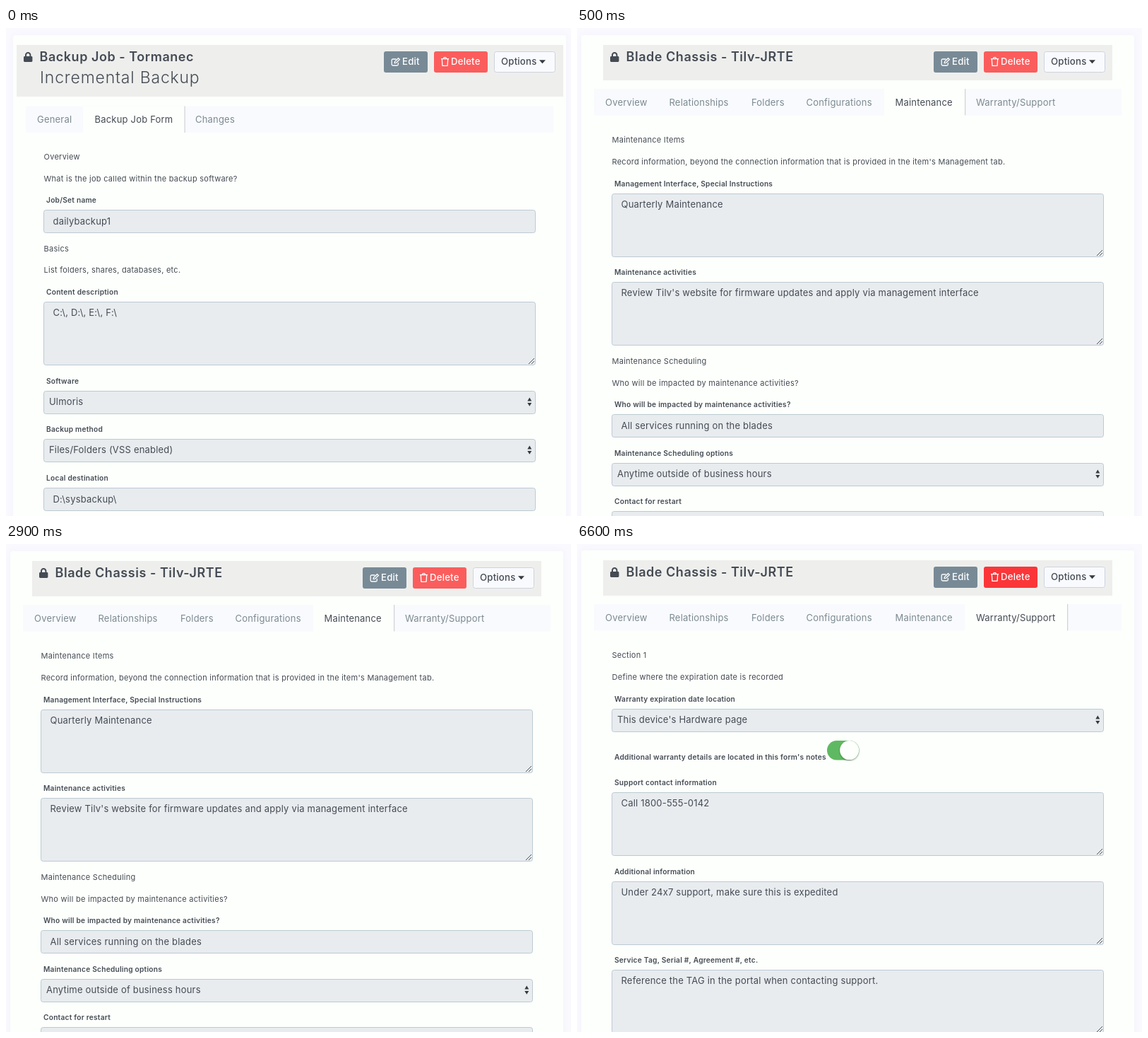
These frames come from a looping animation (800x690 px, 8 s). An HTML page:

```html
<!DOCTYPE html>
<html lang="en">
<head>
<meta charset="utf-8">
<title>Record forms</title>
<style>
  html, body { margin: 0; width: 100%; height: 100%; overflow: hidden; background: #f9f9fe; }
  svg { display: block; width: 800px; height: 690px; }
  text { font: 13px Inter, "Open Sans", sans-serif; letter-spacing: .015em; fill: #454b54; white-space: pre; }
  .title { font-size: 18px; font-weight: 600; letter-spacing: .03em; }
  .subtitle { font-size: 23px; font-weight: 300; letter-spacing: .035em; }
  .note { font-size: 11px; letter-spacing: .024em; }
  .label { font-size: 10.2px; font-weight: 600; letter-spacing: .022em; }
  .tab { fill: #7c8a90; }
  .button { font-size: 13.2px; font-weight: 500; }
  .white { fill: #fff; }
  .field { fill: #e8ecef; stroke: #bccad2; }
</style>
</head>
<body>
<svg id="stage" viewBox="0 0 800 690">
  <defs>
    <filter id="soft" x="-10%" y="-10%" width="120%" height="120%">
      <feDropShadow dx="0" dy="0" stdDeviation="5" flood-color="#e9e9f6" flood-opacity=".45"/>
    </filter>
    <filter id="knob" x="-20%" y="-20%" width="140%" height="150%">
      <feDropShadow dx="0" dy="1" stdDeviation=".8" flood-color="#000" flood-opacity=".4"/>
    </filter>
  </defs>
</svg>
<script>
const escapeText = s => s.replace(/&/g, "&amp;").replace(/</g, "&lt;");
const text = (x, y, s, cls = "") => `<text x="${x}" y="${y}" class="${cls}">${escapeText(s)}</text>`;
const rect = (x, y, w, h, fill, rx = 0, extra = "") =>
  `<rect x="${x}" y="${y}" width="${w}" height="${h}" rx="${rx}" fill="${fill}" ${extra}/>`;
const at = (x, y, content) => `<g transform="translate(${x} ${y})">${content}</g>`;

const lockIcon = `<path d="M3 7V4.3a3.2 3.2 0 0 1 6.4 0V7" fill="none" stroke="#454b54" stroke-width="2"/>`
  + rect(0, 6, 12.4, 8, "#454b54", 1.4);
const editIcon = `<g fill="none" stroke="#fff" stroke-width="1.3">
  <path d="M7 2H2.2Q.7 2 .7 3.5v6Q.7 11 2.2 11h6.1q1.5 0 1.5-1.5V7"/>
  <path d="M4.6 7.6 5 5.6 10 .7 11.9 2.5 6.8 7.4Z"/></g>`;
const trashIcon = `<path d="M0 2.6H11M3.4 2.4 4.2.7H6.8L7.6 2.4M1.3 2.8 1.9 12.3H9.1L9.7 2.8"
  fill="none" stroke="#fff" stroke-width="1.3" stroke-linejoin="round"/>`;

function buttons(x, y, deleteColor) {
  return at(x, y,
    rect(0, 0, 62, 30, "#788a96", 3) + at(10.5, 9, editIcon) + text(26, 19, "Edit", "button white")
    + rect(71, 0, 76, 30, deleteColor, 3) + at(81, 8, trashIcon) + text(95, 19, "Delete", "button white")
    + rect(156.5, .5, 86, 29, "#f9fafd", 3, 'stroke="#cdd3de"') + text(166, 19, "Options", "button")
    + `<path d="M220 12.3h9l-4.5 5z" fill="#343a42"/>`);
}

function card(x, y, width) {
  return rect(x, y, width, 720, "#fdfffc", 4, 'filter="url(#soft)"');
}

// Each tab is [text x, name]; the active one spans from..to.
function tabs(x, y, list, active, from, to) {
  return rect(x, y, 747, 37.5, "#f8fafe")
    + rect(from, y, to - from, 38, "#fdfffc")
    + rect(to - 1, y, 1.2, 37.5, "#cfd3d4")
    + list.map(([tx, name], i) => text(tx, y + 23.5, name, i === active ? "" : "tab")).join("");
}

const box = (x, y, h) => rect(x + .5, y + .5, 696, h - 1, "#e8ecef", 3, 'class="field"');
const input = (x, y, s) => box(x, y, 33) + text(x + 13.5, y + 21, s);
const area = (x, y, s) => box(x, y, 90) + text(x + 13.5, y + 20, s)
  + `<path d="M${x + 687} ${y + 88}l8-8m-4 8l4-4" stroke="#4c5258" fill="none"/>`;
const select = (x, y, s) => box(x, y, 33) + text(x + 8, y + 20, s)
  + `<path d="M${x + 685.3} ${y + 14.4}l3-4.8 3 4.8zm0 2.6h6l-3 4.8z" fill="#343a40"/>`;
const note = (x, y, s) => text(x + .5, y, s, "note");
const label = (x, y, s) => text(x + 4, y, s, "label");
const toggle = (x, y) => rect(x, y, 45.5, 27.5, "#5fb962", 13.7)
  + `<circle cx="${x + 31.7}" cy="${y + 13.6}" r="13.5" fill="#fdfffc" filter="url(#knob)"/>`;

const form = (x, rows) => rows.map(([part, y, s]) => part(x, y, s)).join("");

const deviceTabs = [[40, "Overview"], [130.5, "Relationships"], [247, "Folders"],
  [324.5, "Configurations"], [450.5, "Maintenance"], [565, "Warranty/Support"]];

function devicePage(top, deleteColor, active, from, to, rows) {
  return card(6, top, 783)
    + rect(37, top + 14, 721, 50, "#eeefed")
    + at(47, top + 24, lockIcon)
    + text(69.5, top + 36.5, "Blade Chassis - Tilv-JRTE", "title")
    + buttons(505, top + 23, deleteColor)
    + tabs(24, top + 76, deviceTabs, active, from, to)
    + form(49, rows);
}

const backupPage = card(10, 10, 783)
  + rect(15, 24, 774, 73, "#eeefed")
  + at(25, 34, lockIcon)
  + text(47.5, 46.5, "Backup Job - Tormanec", "title")
  + text(48, 78, "Incremental Backup", "subtitle")
  + buttons(535, 33, "#fb5d5d")
  + tabs(28, 110.5, [[44, "General"], [125.5, "Backup Job Form"], [268, "Changes"]], 1, 109, 253.5)
  + form(53, [
    [note, 186, "Overview"],
    [note, 217, "What is the job called within the backup software?"],
    [label, 247, "Job/Set name"],
    [input, 257, "dailybackup1"],
    [note, 316, "Basics"],
    [note, 346, "List folders, shares, databases, etc."],
    [label, 377, "Content description"],
    [area, 387, "C:\\, D:\\, E:\\, F:\\"],
    [label, 503, "Software"],
    [select, 513, "Ulmoris"],
    [label, 571, "Backup method"],
    [select, 581, "Files/Folders (VSS enabled)"],
    [label, 640, "Local destination"],
    [input, 650, "D:\\sysbackup\\"],
  ]);

const maintenancePage = devicePage(10, "#fb5d5d", 4, 435, 550, [
  [note, 162, "Maintenance Items"],
  [note, 193, "Record information, beyond the connection information that is provided in the item's Management tab."],
  [label, 224, "Management Interface, Special Instructions"],
  [area, 234, "Quarterly Maintenance"],
  [label, 349, "Maintenance activities"],
  [area, 359, "Review Tilv's website for firmware updates and apply via management interface"],
  [note, 475, "Maintenance Scheduling"],
  [note, 506, "Who will be impacted by maintenance activities?"],
  [label, 536, "Who will be impacted by maintenance activities?"],
  [input, 546, "All services running on the blades"],
  [label, 605, "Maintenance Scheduling options"],
  [select, 615, "Anytime outside of business hours"],
  [label, 673, "Contact for restart"],
  [input, 683, ""],
]);

const warrantyPage = devicePage(9, "#fb3639", 5, 549, 695, [
  [note, 161, "Section 1"],
  [note, 192, "Define where the expiration date is recorded"],
  [label, 223, "Warranty expiration date location"],
  [select, 233, "This device's Hardware page"],
  [label, 305, "Additional warranty details are located in this form's notes"],
  [label, 341, "Support contact information"],
  [area, 351, "Call 1800-555-0142"],
  [label, 467, "Additional information"],
  [area, 477, "Under 24x7 support, make sure this is expedited"],
  [label, 592, "Service Tag, Serial #, Agreement #, etc."],
  [area, 602, "Reference the TAG in the portal when contacting support."],
]) + toggle(354, 278);

const stage = document.getElementById("stage");
const pages = [backupPage, maintenancePage, warrantyPage].map(content => {
  const group = document.createElementNS("http://www.w3.org/2000/svg", "g");
  group.innerHTML = content;
  stage.append(group);
  return group;
});

const start = performance.now();
function draw() {
  const time = (performance.now() - start) % 8000;
  const current = time < 500 ? 0 : time < 4500 ? 1 : 2;
  pages.forEach((page, i) => { page.style.display = i === current ? "" : "none"; });
  requestAnimationFrame(draw);
}
draw();
</script>
</body>
</html>
```
